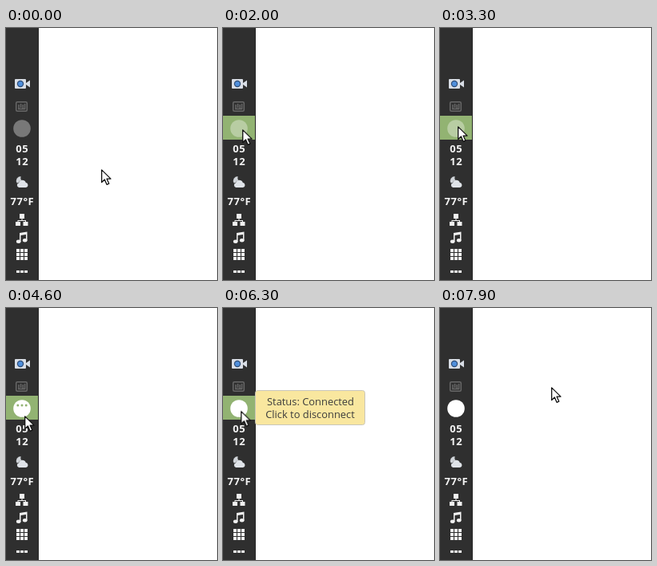
These frames come from a looping animation (264 by 316 pixels, 8 s). An HTML page:

```html
<!DOCTYPE html>
<html lang="en">
<head>
<meta charset="utf-8">
<title>Panel status</title>
<style>
  html, body { margin: 0; width: 100%; height: 100%; overflow: hidden; background: #fff; }
  svg { display: block; width: 264px; height: 316px; }

  .label { font: 700 13px "Noto Sans", sans-serif; letter-spacing: .5px; fill: #f4f4f4; text-anchor: middle; }
  .tip rect { fill: #f9e79f; stroke: #c9c6ba; }
  .tip text { font: 12.9px "Open Sans", sans-serif; fill: #3c3c3c; text-anchor: middle; }

  .hover, .status, .dots, .tip { animation: 8s step-end infinite; }
  .hover { animation-name: hover; }
  .status { animation-name: status; }
  .dots { animation-name: dots; }
  .offline { animation-name: offline; }
  .waiting { animation-name: waiting; }
  .online { animation-name: online; }
  .cursor { animation: move 8s linear infinite; }

  @keyframes hover { 0%, 91.25% { opacity: 0 } 21.25% { opacity: 1 } }
  @keyframes status { 0% { opacity: .35 } 47.5%, 100% { opacity: 1 } }
  @keyframes dots { 0%, 78.75% { opacity: 0 } 47.5% { opacity: 1 } }
  @keyframes offline { 0%, 37.5% { opacity: 0 } 30% { opacity: 1 } }
  @keyframes waiting { 0%, 78.75% { opacity: 0 } 62.5% { opacity: 1 } }
  @keyframes online { 0%, 91.25% { opacity: 0 } 78.75% { opacity: 1 } }

  @keyframes move {
    0%, 8.75% { transform: translate(119px, 177px); animation-timing-function: ease-in-out }
    20% { transform: translate(31px, 150px) }
    21.25% { transform: translate(26px, 134px) }
    22.5%, 25% { transform: translate(24px, 127px) }
    30%, 36.25% { transform: translate(30px, 124px) }
    41.25%, 55% { transform: translate(22px, 123px) }
    57.5%, 60% { transform: translate(23px, 135px) }
    67.5%, 78% { transform: translate(20px, 129px) }
    81.25%, 88.75% { transform: translate(29px, 128px) }
    93.75%, 97.5% { transform: translate(146px, 100px) }
    98.75%, 100% { transform: translate(139px, 99px) }
  }
</style>
</head>
<body>
<svg viewBox="0 0 264 316">
  <rect width="264" height="316" fill="#fff"/>
  <rect width="41" height="316" fill="#2f2f2f"/>
  <rect x="40" width="1" height="316" fill="#262626"/>
  <rect class="hover" y="110" width="40" height="30" fill="#92b372"/>

  <!-- camera -->
  <g fill="#d9dee6">
    <rect x="11" y="64" width="14" height="12" rx="1"/>
    <path d="M25 69l5-3.5v9l-5-3.5z"/>
    <circle cx="18" cy="70" r="4.2" fill="#2c4a73"/>
    <circle cx="18" cy="70" r="3" fill="#4f8fdc"/>
  </g>

  <!-- inactive applet -->
  <g fill="none" stroke="#686868" stroke-width="1.5">
    <rect x="12.7" y="92.7" width="13.6" height="11.6" rx="1.5"/>
    <path d="M16 96v6M18.6 95v5M21.2 96v6M23.6 95v7M15 101.5h9"/>
  </g>

  <circle class="status" cx="20" cy="126" r="10.8" fill="#fff"/>
  <g class="dots" fill="#92b372">
    <circle cx="14.8" cy="122" r="1.5"/>
    <circle cx="20" cy="122" r="1.5"/>
    <circle cx="25.2" cy="122" r="1.5"/>
  </g>

  <g class="label">
    <text x="20.2" y="156">05</text>
    <text x="20.2" y="172">12</text>
    <text x="20.4" y="222">77°F</text>
  </g>

  <!-- weather -->
  <path d="M18.5 186a5.6 5.6 0 0 0-4.8 8.6l2.2-.8a4 4 0 0 1 3.3-2.9a7 7 0 0 1-.7-4.9z" fill="#cfd3d8"/>
  <path d="M16.2 200a3 3 0 0 1-.2-5.8a4.6 4.6 0 0 1 8.7-.5a3.2 3.2 0 0 1 .2 6.3z" fill="#dfe3e8"/>

  <!-- network -->
  <g fill="#f2f2f2">
    <rect x="17" y="233" width="6" height="6"/>
    <rect x="12" y="243" width="6" height="5"/>
    <rect x="21.5" y="243" width="6" height="5"/>
    <path d="M19.5 239h1v2h4.5v2h-1v-1h-8.500v1h-1v-2h5z"/>
  </g>

  <!-- music -->
  <g fill="#f2f2f2">
    <path d="M17 257l9.500-1.500v11h-1.500v-7.500l-6.500 1v8h-1.500z"/>
    <ellipse cx="15.7" cy="267.8" rx="2.8" ry="2.2"/>
    <ellipse cx="23.7" cy="266.300" rx="2.800" ry="2.200"/>
  </g>

  <!-- app grid and overflow -->
  <g stroke="#f2f2f2" stroke-width="4" stroke-dasharray="4 1">
    <path d="M13 279h14M13 284h14M13 289h14"/>
    <path d="M13 305.500h14" stroke-width="3"/>
  </g>

  <g class="tip offline">
    <rect x="40.5" y="103.500" width="151" height="43" rx="3"/>
    <text x="116" y="122">Status: Disconnected</text>
    <text x="116.500" y="138">Click to connect</text>
  </g>
  <g class="tip waiting">
    <rect x="40.5" y="103.500" width="127" height="43" rx="3"/>
    <text x="104" y="122">Status: Changing</text>
    <text x="104" y="138">Please wait...</text>
  </g>
  <g class="tip online">
    <rect x="40.5" y="103.500" width="137" height="43" rx="3"/>
    <text x="109.500" y="122">Status: Connected</text>
    <text x="109" y="138">Click to disconnect</text>
  </g>

  <g class="cursor">
    <path d="M.7.9v15.600l3.700-3.500 2.700 6.300 2.700-1.200-2.700-6h5z" fill="#fff" stroke="#111" stroke-width="1.300" stroke-linejoin="round"/>
  </g>
</svg>
</body>
</html>
```
